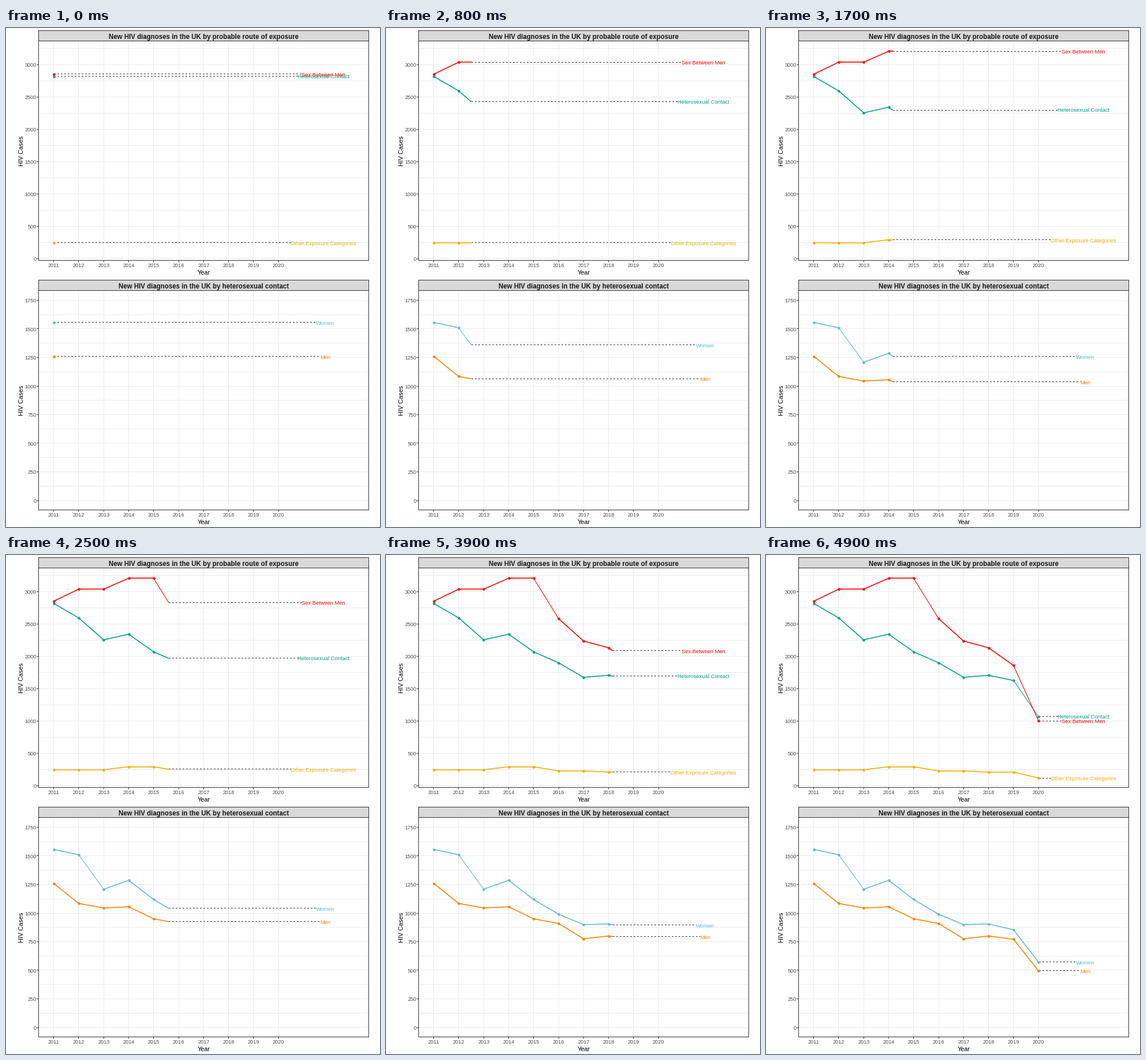
A matplotlib script for the animation above (10000 ms loop, 648x864 px).

```python
import numpy as np
import matplotlib.pyplot as plt
from matplotlib.animation import FuncAnimation
from matplotlib.collections import LineCollection
from matplotlib.patches import Rectangle

W, H, DPI = 648, 864, 72
FRAMES, STEP_MS, LAST = 100, 100, 49   # the reveal ends at LAST, then holds
YEARS = np.arange(2011, 2021)
X0, DX = 82.2, 43.27
LEFT, RIGHT = 56, 628
GRID, EDGE, AXIS = "#ebebeb", "#333333", "#4d4d4d"
LABEL, TICK = 9.4, 9.1
CAP = 0.358                            # half a capital's height, in ems

plt.rcParams["font.family"] = "Liberation Sans"
fig = plt.figure(figsize=(W / DPI, H / DPI), dpi=DPI, facecolor="white")
ax = fig.add_axes([0, 0, 1, 1])
ax.set_xlim(-0.5, W - 0.5)             # whole numbers are pixel centres
ax.set_ylim(H - 0.5, -0.5)
ax.axis("off")

steps = np.arange(len(YEARS))
xs = X0 + DX * steps
key_frames = np.round(LAST * steps / steps[-1])


def line(x, y, color, z, **kw):
    """A crisp one-pixel rule."""
    return ax.plot(np.round(x), np.round(y), color=color, lw=1, zorder=z,
                   snap=False, solid_capstyle="butt", **kw)[0]


def text(x, y, s, size, color="black", ha="center", **kw):
    """Write s with its capitals centred on y."""
    return ax.text(x, y + CAP * size, s, size=size, color=color, ha=ha,
                   va="baseline", zorder=9, **kw)


def box(top, bottom, fill, z):
    ax.add_patch(Rectangle((LEFT, top), RIGHT - LEFT, bottom - top, lw=1,
                           fc=fill, ec=EDGE, snap=False, zorder=z))


class Panel:
    def __init__(self, top, title, zero, scale, step, count, label_x):
        self.zero, self.scale, self.label_x = zero, scale, label_x
        p_top, p_bottom = top + 18, top + 398
        box(top, p_top, "#d9d9d9", 3)
        box(p_top, p_bottom, "none", 4)
        text(341.7, top + 10.3, title, 11.53, "#1a1a1a", weight="bold")

        for k in range(count):
            y, minor = self.y(k * step), self.y((k + 0.5) * step)
            line([LEFT, RIGHT], [y, y], GRID, 1)
            if minor > p_top:
                line([LEFT, RIGHT], [minor, minor], GRID, 1)
            line([LEFT - 3, LEFT], [y, y], EDGE, 2)
            text(52.5, y + 0.6, str(k * step), TICK, AXIS, ha="right")
        for x, year in zip(xs, YEARS):
            line([x, x], [p_top, p_bottom], GRID, 1)
            line([x, x], [p_bottom, p_bottom + 3], EDGE, 2)
            text(x, p_bottom + 8.6, str(year), TICK, AXIS)

        text(342, p_bottom + 20.5, "Year", 11)
        ax.text(29, top + 208.5, "HIV Cases", size=11, rotation=90, ha="center",
                va="baseline", rotation_mode="anchor")

    def y(self, value):
        return self.zero - self.scale * value


class Series:
    def __init__(self, panel, name, color, values, nudge=0.7):
        self.ys, self.nudge = panel.y(values), nudge
        self.dash = line([], [], EDGE, 5, dashes=(3, 3), dash_capstyle="butt")
        self.path = LineCollection([], colors=color, capstyle="round", zorder=6)
        ax.add_collection(self.path, autolim=False)
        self.dots, = ax.plot([], [], "o", ms=4.6, mew=0, color=color, zorder=7)
        self.label = text(panel.label_x, 0, name, LABEL, color)
        self.dash_end = self.label.get_window_extent().x0

    def show(self, head):
        seen = xs[steps <= head]
        x = X0 + DX * head
        y = np.interp(x, xs, self.ys)
        pts = np.column_stack([np.append(seen, x),
                               np.append(self.ys[:len(seen)], y)])
        self.path.set_segments(np.stack([pts[:-1], pts[1:]], axis=1))
        # steep stretches come out thinner
        dx, dy = np.abs(np.diff(pts, axis=0)).T
        self.path.set_linewidths(np.where(dy > 1.33 * dx, 1.1, 1.6))
        self.dots.set_data(seen, self.ys[:len(seen)])
        self.dash.set_data([np.round(x) + 0.5, self.dash_end],
                           [np.round(y)] * 2)
        self.label.set_y(y + self.nudge + CAP * LABEL)


routes = Panel(4, "New HIV diagnoses in the UK by probable route of exposure",
               398.6, 0.1119, 500, 7, 549.5)
sexes = Panel(436, "New HIV diagnoses in the UK by heterosexual contact",
              817.5, 0.198, 250, 8, 553)

# women's cases slow down along a parabola from 2014 to 2017
left = np.arange(3, -1, -1)
women = np.concatenate([[1557, 1510, 1209], 899 + 72 * left + 19 * left ** 2,
                        [905, 854, 572]])
men = np.array([1260, 1084, 1045, 1055, 950, 909, 775, 800, 771, 495])
gay = np.repeat([2852, 3038, 3207, 2582, 2235, 2131, 1857, 1001],
                [1, 2, 2, 1, 1, 1, 1, 1])
other = np.repeat([244, 290, 226, 207, 117], [3, 2, 2, 2, 1])

series = [
    Series(routes, "Heterosexual Contact", "#00A08A", men + women, -0.5),
    Series(routes, "Other Exposure Categories", "#F2AD00", other),
    Series(routes, "Sex Between Men", "#FF0000", gay),
    Series(sexes, "Men", "#F98400", men),
    Series(sexes, "Women", "#5BBCD6", women),
]


def update(i):
    head = np.interp(min(i, LAST), key_frames, steps)
    for s in series:
        s.show(head)
    return []


anim = FuncAnimation(fig, update, frames=FRAMES, interval=STEP_MS,
                     init_func=lambda: update(0), repeat=True, repeat_delay=0,
                     blit=False)
plt.show()
```
